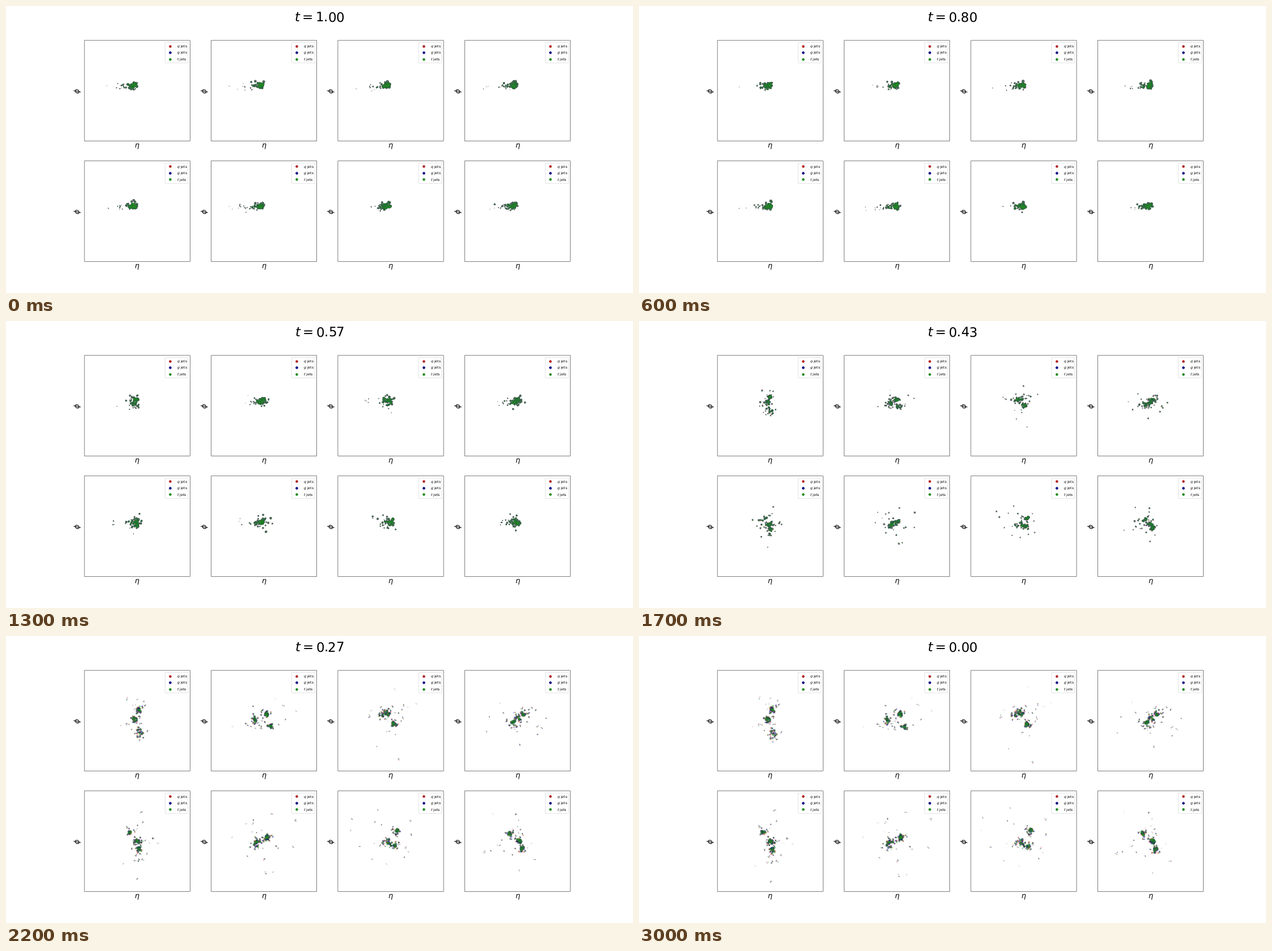
Recreate the animation shown at these times as a matplotlib script. Size 1105 px wide and 507 px high, loop 3100 ms.

```python
import numpy as np
import matplotlib.pyplot as plt
from matplotlib.animation import FuncAnimation
from matplotlib.patches import FancyBboxPatch, Rectangle

W, H = 1105, 507
DPI = 46.04
PX = 72 / DPI          # points per pixel
FRAMES = 31
SPECIES = {"q": "firebrick", "g": "navy", "t": "forestgreen"}

# Default subplot margins with a gap of 0.2 panels
PANEL_W = W * 0.775 / 4.6
PANEL_H = H * 0.77 / 2.2
CORNERS = [(W * 0.125 + 1.2 * PANEL_W * col, H * 0.12 + 1.2 * PANEL_H * row)
           for row in range(2) for col in range(4)]

plt.rcParams.update({"text.hinting": "none", "font.family": "DejaVu Sans"})


class Jet:
    """A noisy streak that unfolds into three cores, fringes and a halo."""

    def __init__(self, corner, cores, halo, seed):
        rng = np.random.default_rng(seed)
        self.center = np.add(corner, (PANEL_W / 2, PANEL_H / 2))
        cores = np.array(cores)
        tight = np.repeat(cores, (13, 10, 8), axis=0)
        loose = np.repeat(cores, 5, axis=0)
        spread = np.concatenate([rng.normal(0, 3, tight.shape),
                                 rng.normal(0, 6.5, loose.shape)])
        strays = np.clip(rng.normal(0, halo, (22, 2)), -75, 75)
        self.end = np.concatenate([np.concatenate([tight, loose]) + spread,
                                   strays])
        distance = np.hypot(*spread.T)
        self.end_radius = np.concatenate([
            0.7 + 2.3 * np.exp(-distance / 9) * rng.uniform(0.4, 1, len(spread)),
            rng.uniform(0.5, 1.1, len(strays))])
        n = len(self.end)
        self.drift = rng.normal(0, 1, (3, n, 2))
        self.waves = rng.normal(size=(2, 3, n))

    def noise(self, t):
        """Streak with a tail of small dots to the left, slowly reshuffled."""
        angle = 2.2 * (1 - t)
        a, b, c = np.cos(angle) * self.waves[0] + np.sin(angle) * self.waves[1]
        reach = np.minimum(12 * np.exp(0.65 * a), 64)
        radius = np.clip(2.3 * np.exp(-reach / 38) + 0.4 * b, 0.6, 2.7)
        x = 2 + 4 * min(1, 5 * (1 - t)) - reach
        y = -5.5 - 3 * (radius - 0.6) + 2.8 * c
        return np.column_stack([x, y]), radius

    def at(self, t):
        w = 1 / (1 + (t / 0.45) ** 5)
        cloud, cloud_radius = self.noise(t)
        spots = self.center + w * self.end + (1 - w) * cloud
        radius = w * self.end_radius + (1 - w) * cloud_radius
        return spots + w ** 2 * self.drift, radius


# Three core offsets from the panel centre, then the halo spread
SHAPES = [
    ([(-4, -3), (4, -20), (5, 21)], (14, 28)),
    ([(5, -12), (-17, -1), (12, 11)], (24, 18)),
    ([(5, 7), (-4, -14), (-15, -12)], (26, 30)),
    ([(-7, 4), (11, -12), (2, -4)], (26, 18)),
    ([(2, 0), (5, 15), (-11, -17)], (18, 32)),
    ([(7, -6), (-8, 2), (-17, 8)], (32, 32)),
    ([(-4, 1), (12, -19), (8, 8)], (32, 24)),
    ([(5, 1), (-12, -13), (8, 15)], (28, 25)),
]
jets = [Jet(corner, cores, halo, seed)
        for seed, (corner, (cores, halo)) in enumerate(zip(CORNERS, SHAPES))]

fig = plt.figure(figsize=(W / DPI, H / DPI), dpi=DPI, facecolor="white")
ax = fig.add_axes([0, 0, 1, 1])
ax.set(xlim=(0, W), ylim=(H, 0))
ax.axis("off")
title = fig.suptitle("", fontsize=36)


def marker_size(radius):
    """Scatter area whose outline of 1.5 points ends at this pixel radius."""
    return (2 * np.maximum(radius - 0.48, 0.08) * PX) ** 2


def draw_legend(right, top):
    x = right - 44
    ax.add_patch(FancyBboxPatch(
        (x, top + 3.5), 40.7, 36.2, boxstyle="round,pad=0,rounding_size=1.3",
        fc="white", ec="0.8", lw=1, alpha=0.8, zorder=4, snap=False))
    for row, (name, color) in enumerate(SPECIES.items()):
        y = top + 9.7 + 11.5 * row
        ax.scatter(x + 8.8, y, s=marker_size(2.25), c=color, lw=1.5, zorder=5)
        ax.text(x + 20.5, y + 2.2, f"${name}$ jets", fontsize=10,
                va="baseline", zorder=5)


for left, top in CORNERS:
    ax.add_patch(Rectangle((left, top), PANEL_W, PANEL_H, fill=False,
                           lw=0.8, ec="black", zorder=3, snap=False))
    ax.text(left + PANEL_W / 2, top + PANEL_H + 9, r"$\eta$", fontsize=20,
            ha="center", va="center")
    ax.text(left - 11, top + PANEL_H / 2, r"$\phi$", fontsize=20, rotation=90,
            ha="center", va="center")
    draw_legend(left + PANEL_W, top)

layers = [ax.scatter([], [], c=color, alpha=0.4, lw=1.5, zorder=2)
          for color in SPECIES.values()]


def update(frame):
    t = 1 - frame / (FRAMES - 1)
    title.set_text(f"$t={t:.2f}$")
    states = [jet.at(t) for jet in jets]
    sizes = marker_size(np.concatenate([radius for _, radius in states]))
    for k, layer in enumerate(layers):
        layer.set_offsets(np.concatenate([spots[k] for spots, _ in states]))
        layer.set_sizes(sizes)
    return [title, *layers]


anim = FuncAnimation(fig, update, frames=FRAMES, interval=100,
                     repeat=True, repeat_delay=0, blit=False)
plt.show()
```
